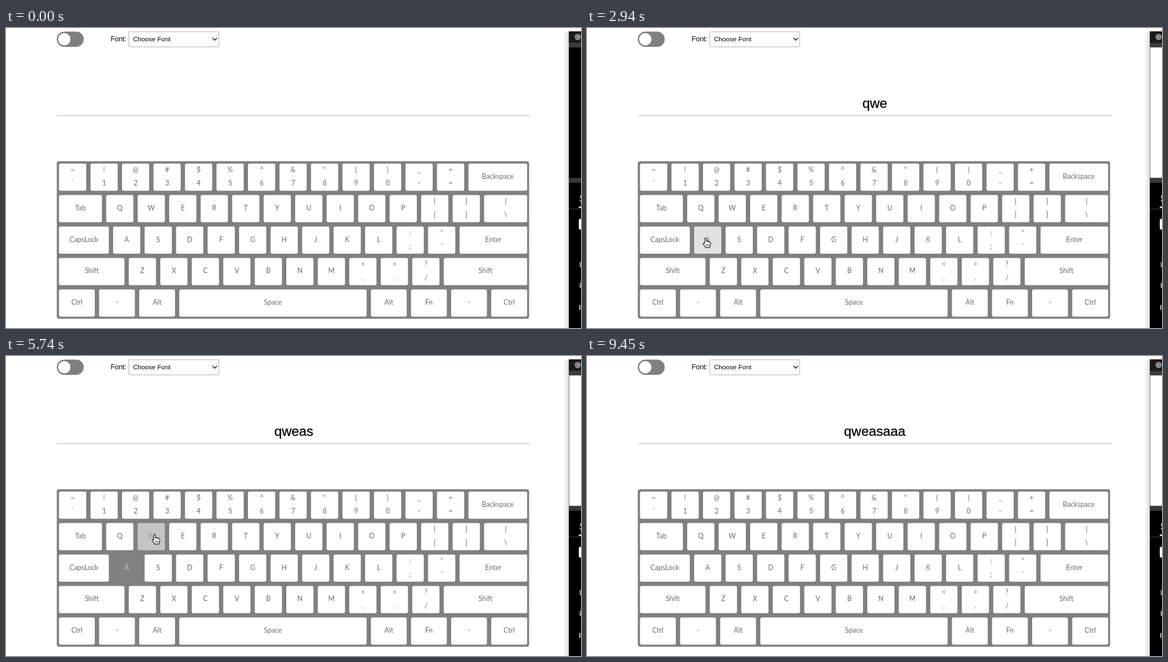
An HTML page that plays this animation: 1036x541 px, repeating every 9.94 s.

```html
<!DOCTYPE html>
<html lang="en">
<head>
<meta charset="utf-8">
<title>Virtual keyboard</title>
<style>
html, body { margin: 0; width: 100%; height: 100%; overflow: hidden; background: #fff; }
svg { display: block; }
text { font-family: "Liberation Sans", Arial, sans-serif; }
#keys text { font: 12.5px Lato, sans-serif; text-anchor: middle; }
</style>
</head>
<body>
<svg width="1036" height="541" viewBox="0 0 1036 541">
  <defs>
    <linearGradient id="shade">
      <stop offset="0" stop-color="#fff"/><stop offset="1" stop-color="#dcdcdc"/>
    </linearGradient>
  </defs>

  <rect x="91.5" y="6.5" width="48.5" height="27.5" rx="13.75" fill="#808080"/>
  <circle cx="105" cy="20.2" r="11" fill="#fff"/>
  <text x="188.7" y="23.8" font-size="12.4">Font:</text>
  <rect x="221.3" y="6.8" width="162" height="27.2" rx="2" fill="#fff" stroke="#aaa"/>
  <text x="228.7" y="24.3" font-size="11.8">Choose Font</text>
  <path d="M372 18l4 4 4-4" fill="none" stroke="#111" stroke-width="1.5"/>

  <text id="typed" x="518.5" y="144.3" font-size="24.3" text-anchor="middle" stroke="#000" stroke-width=".3"></text>
  <path id="spell" d="M485 147.2H552" stroke="#e0525a" stroke-width="1.8" stroke-linecap="round" stroke-dasharray="0 3"/>
  <path d="M91.5 158.2H946" stroke="#ccc" stroke-width="1.5"/>

  <rect x="91.5" y="240.3" width="851" height="284" rx="4" fill="#808080"/>
  <g id="keys"></g>

  <rect x="1004" y="8" width="10" height="533" fill="url(#shade)"/>
  <rect x="1014" y="6" width="22" height="535" fill="#000"/>
  <rect x="1014" y="6" width="22" height="20.5" fill="#1a1a1a"/>
  <circle cx="1030" cy="16.3" r="5.7" fill="#858585"/>
  <rect x="1014" y="26.5" width="22" height="8.5" fill="#3c3c3c"/>
  <rect id="preview" x="1014.5" y="35" width="22" height="235.5"/>
  <rect x="1014" y="270.5" width="22" height="8.5" fill="#383838"/>
  <path d="M1014 326.5H1036" stroke="#444"/>
  <g fill="#fff">
    <rect x="1032" y="322" width="4" height="2.5"/>
    <rect x="1032" y="344" width="12" height="19.5" rx="3"/>
    <text x="1033" y="314" font-size="18">S</text>
    <g font-size="12">
      <text x="1033" y="431">L</text><text x="1033" y="469">F</text><text x="1032" y="509">F</text>
    </g>
  </g>

  <g id="cursor" stroke-linejoin="round">
    <g id="hand" fill="#fff" stroke="#111" stroke-width="1.1">
      <path d="M-1.5 1.5a1.5 1.5 0 0 1 3 0V6.5a1.4 1.4 0 0 1 2.8 .3a1.4 1.4 0 0 1 2.7 .5a1.3 1.3 0 0 1 2.2 1v3c0 2.5-1.5 3-1.5 5.7h-7.5c0-1.8-3-4-4.2-6.2c-1-1.7 1-2.6 2.5-.8z"/>
      <path d="M1.6 11v3.5M4 11v3.5M6.3 11v3.5" stroke-width=".9"/>
    </g>
    <path id="arrow" d="M0 0v13l3-2.8 2 4.8 2.2-1-2-4.6h4z" fill="#000" stroke="#fff"/>
    <path id="beam" d="M-3-8q3 0 3 2q0-2 3-2M0-6V6M-3 8q3 0 3-2q0 2 3 2" fill="none" stroke="#222" stroke-width="1.2"/>
  </g>
</svg>
<script>
const LOOP = 9940, STEP = 10, FADE = 200, MS_PER_PX = 1.5;
const LEFT = 95.5, RIGHT = 939, TOP = 244.4, SIZE = 49, GAP = 7.75, PITCH = SIZE + GAP;
const $ = id => document.getElementById(id);

function add(parent, tag, attrs, text = '') {
  const el = document.createElementNS('http://www.w3.org/2000/svg', tag);
  for (const name in attrs) el.setAttribute(name, attrs[name]);
  el.textContent = text;
  return parent.appendChild(el);
}

// Letter keys are square, named ones wider; the last key fills its row.
const wide = { Tab: 77.25, CapsLock: 89.75, Shift: 118, Space: 337.5 };
const rows = [
  '~` !1 @2 #3 $4 %5 ^6 &7 *8 (9 )0 _- += Backspace',
  'Tab Q W E R T Y U I O P {[ }] |\\',
  'CapsLock A S D F G H J K L :; "\' Enter',
  'Shift Z X C V B N M <, >. ?/ Shift',
  'Ctrl - Alt Space Alt Fn - Ctrl'
];
const keys = [];
rows.forEach((row, r) => {
  const names = row.split(' '), y = TOP + r * PITCH, base = r == 4 ? 64.5 : SIZE;
  let x = LEFT;
  names.forEach((name, i) => {
    const w = i == names.length - 1 ? RIGHT - x : wide[name] || base;
    const rect = add($('keys'), 'rect', { x, y, width: w, height: SIZE, rx: 3 });
    const label = add($('keys'), 'g', {});
    const put = (s, dy) => add(label, 'text', { x: x + w / 2, y: y + dy }, s);
    if (/^[^a-z].$/i.test(name)) { put(name[0], 15.8); put(name[1], 40); }
    else put(name, 27.8);
    keys.push({ name, x, y, w, rect, label });
    x += w + GAP;
  });
});

const onKey = (name, dx = -4) => {
  const k = keys.find(k => k.name == name);
  return [k.x + k.w / 2 + dx, k.y + SIZE / 2 - 3.5];
};
const besideQ = [234, 322], aboveA = [209, 354];

// Arrival time and place; the pointer rests until it must set off for the next stop.
const stops = [
  [70, [1032, 505]], [700, [150, 445]], [1050, besideQ],
  [1640, onKey('Q')], [1860, besideQ], [2030, onKey('W', -2)], [2400, onKey('E')],
  [2750, aboveA], [2940, onKey('A')], [3600, onKey('S', -12)],
  [5150, onKey('A')], [5740, onKey('W', 6)], [6050, onKey('A')],
  [6450, [560, 110]], [7000, [567, 162]], [7350, [600, 130]],
  [7900, onKey('A')], [9240, onKey('A')]
];
const clicks = [1720, 2170, 2450, 3200, 4620, 8050, 8330, 8470];

function pointer(t) {
  const i = stops.findIndex(s => s[0] > t);
  if (i < 1) return null;
  const [t0, [x0, y0]] = stops[i - 1], [t1, [x1, y1]] = stops[i];
  const span = Math.min(t1 - t0, MS_PER_PX * Math.hypot(x1 - x0, y1 - y0)) || 1;
  const k = Math.max(0, 1 - (t1 - t) / span), e = k * k * (3 - 2 * k);
  return { x: x0 + (x1 - x0) * e, y: y0 + (y1 - y0) * e };
}

const keyAt = p => p ? keys.findIndex(k =>
  p.x >= k.x && p.x <= k.x + k.w && p.y >= k.y && p.y <= k.y + SIZE) : -1;

const hovered = Array.from({ length: LOOP / STEP }, (_, i) => keyAt(pointer(i * STEP)));
const letters = clicks.map(t => keys[keyAt(pointer(t))].name.toLowerCase());

function hoverLevels(t) {
  const levels = keys.map(() => 0), d = STEP / FADE;
  for (let i = 0; i * STEP < t; i++)
    for (let k = 0; k < keys.length; k++)
      levels[k] = Math.max(0, Math.min(1, levels[k] + (hovered[i] == k ? d : -d)));
  return levels;
}

const gray = (a, b, k) => `rgb(${Array(3).fill(Math.round(a + (b - a) * k))})`;
const show = (id, on) => $(id).setAttribute('visibility', on ? 'visible' : 'hidden');

function draw(t) {
  hoverLevels(t).forEach((level, i) => {
    keys[i].rect.setAttribute('fill', gray(255, 63, level));
    keys[i].label.setAttribute('fill', gray(108, 255, level));
  });
  $('typed').textContent = letters.filter((_, i) => clicks[i] <= t).join('');
  show('spell', t >= 6500 && t < 8000);
  $('preview').setAttribute('fill', t < 280 ? '#000' : '#fff');

  const p = pointer(t), overKey = keyAt(p) >= 0;
  const overInput = p && p.y > 112 && p.y < 158;
  show('hand', overKey);
  show('beam', overInput);
  show('arrow', p && !overKey && !overInput);
  if (p) $('cursor').setAttribute('transform', `translate(${p.x} ${p.y})`);
}

const start = performance.now();
function frame() {
  draw((performance.now() - start) % LOOP);
  requestAnimationFrame(frame);
}
frame();
</script>
</body>
</html>
```
